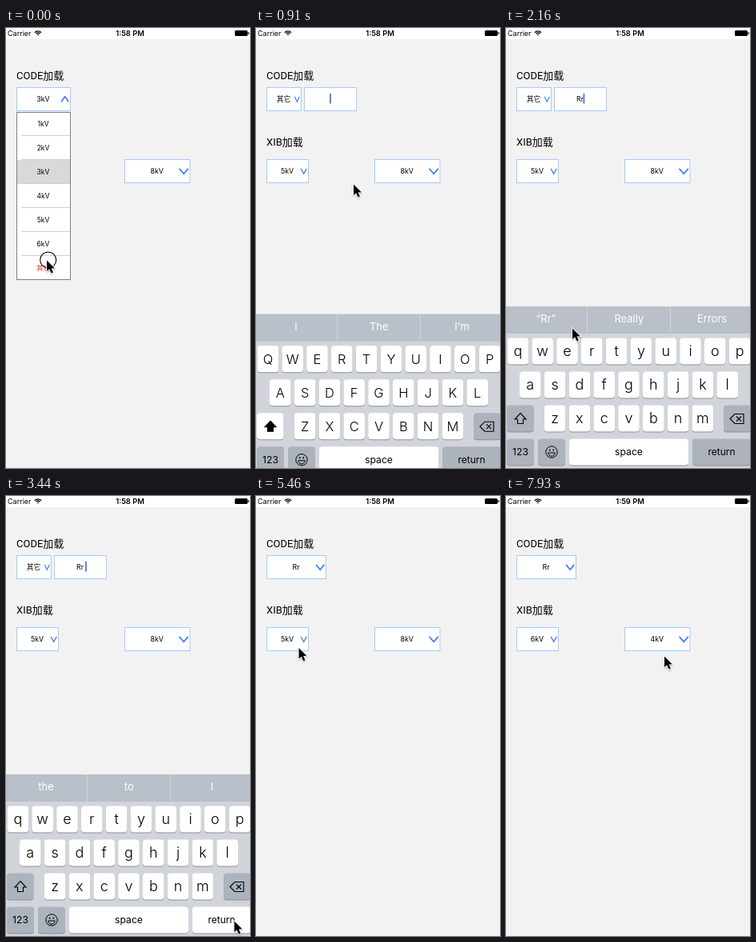
Recreate the animation shown at these times as an HTML page with a canvas. Size 305 by 550 pixels, loop 7990 ms.

```html
<!DOCTYPE html>
<html lang="zh">
<head>
<meta charset="utf-8">
<style>
html, body { margin: 0; width: 100%; height: 100%; overflow: hidden; background: #f2f2f2; }
canvas { display: block; width: 305px; height: 550px; }
</style>
</head>
<body>
<canvas id="stage"></canvas>
<script>
const LOOP = 7990, W = 305, H = 550, BLUE = '#3478f6', DARK_KEY = '#acb3bd';
const CJK = '"Noto Sans CJK SC", "Noto Sans CJK", sans-serif';
const canvas = document.getElementById('stage');
const c = canvas.getContext('2d');
const scale = window.devicePixelRatio || 1;
canvas.width = W * scale;
canvas.height = H * scale;

const OTHER = '其它';
const LEVELS = [1, 2, 3, 4, 5, 6].map(n => n + 'kV');
const WITH_OTHER = [...LEVELS, OTHER];

const rowY = (top, row) => top + 30 * (row + 0.5);
const KEYBOARD_H = 202, KEY_PITCH = 30.8, ROW_PITCH = 42;
const FIRST_ROW = H - KEYBOARD_H + 56;

// What the user does, in order; a tap takes effect shortly after it lands.
const TAP = {
  pickOther: 0, typeUpper: 1480, typeLower: 1860, suggest: 2480, enter: 3320,
  openLeft: 4140, pickFive: 4830, reopenLeft: 5590, pickSix: 6270, openRight: 6880, pickFour: 7460
};
const REACTION = 60;
const tapTimes = Object.values(TAP);

// The pointer eases from stop to stop and rests at each one.
const REST = 100;
const stop = (time, x, y) => ({ time, x, y });
const STOPS = [
  stop(TAP.pickOther, 51, 290),
  stop(860, 122, 195),
  stop(TAP.typeUpper, 106, FIRST_ROW),
  stop(TAP.typeLower, 106, FIRST_ROW),
  stop(2110, 83, 375),
  stop(TAP.suggest, 50, 365),
  stop(TAP.enter, 286, 532),
  stop(TAP.openLeft, 55, 179),
  stop(4340, 60, 267),
  stop(TAP.pickFive, 50, rowY(195, 4)),
  stop(TAP.reopenLeft, 54, 174),
  stop(TAP.pickSix, 42, rowY(195, 5)),
  stop(6380, 42, rowY(195, 5)),
  stop(TAP.openRight, 189, 179),
  stop(TAP.pickFour, 190, rowY(195, 3)),
  stop(7850, 198, 200)
];

const clamp = v => Math.max(0, Math.min(1, v));
const smooth = v => v * v * (3 - 2 * v);
const easeOut = v => 1 - (1 - v) ** 3;
const ramp = (t, start, length) => clamp((t - start) / length);
const within = (t, from, to) => t >= from && t < to;
const isTapped = (t, tap) => within(t, tap, tap + 90);
const happened = (t, tap) => t >= tap + REACTION;
const openness = (t, openTap, pickTap) =>
  easeOut(ramp(t, openTap + REACTION, 160)) - easeOut(ramp(t, pickTap + REACTION, 160));

function text(s, x, cy, size, { color = '#000', align = 'center', weight = 400, face = 'Inter' } = {}) {
  c.font = `${weight} ${size}px ${face}, ${CJK}`;
  c.fillStyle = color;
  c.textAlign = align;
  c.fillText(s, x, cy + size * 0.36);
}

function rect(x, y, w, h, color) {
  c.fillStyle = color;
  c.fillRect(x, y, w, h);
}

function roundRect(x, y, w, h, r, color) {
  c.beginPath();
  c.roundRect(x, y, w, h, r);
  c.fillStyle = color;
  c.fill();
}

function frame(x, y, w, h, color) {
  c.strokeStyle = color;
  c.lineWidth = 1;
  c.strokeRect(x + 0.5, y + 0.5, w - 1, h - 1);
}

function line(points, color, width, { closed = false, fill } = {}) {
  c.beginPath();
  points.forEach(([x, y]) => c.lineTo(x, y));
  if (closed) c.closePath();
  c.strokeStyle = color;
  c.lineWidth = width;
  c.stroke();
  if (fill) { c.fillStyle = fill; c.fill(); }
}

function arc(x, y, r, from, to, width, closed = false) {
  c.beginPath();
  c.arc(x, y, r, from * Math.PI, to * Math.PI);
  if (closed) c.closePath();
  c.strokeStyle = '#000';
  c.lineWidth = width;
  c.stroke();
}

function box(x, y, w) {
  rect(x, y, w, 30, '#fff');
  frame(x, y, w, 30, '#a6caf8');
}

function dropdown({ x, y, w, label, open = 0, items, selected }) {
  const centerX = x + w / 2 - 0.5, cy = y + 15;
  box(x, y, w);
  text(label, centerX, cy, 8.8);
  const half = w * 0.068, tipX = x + w - 2.7 - half, rise = open > 0 ? -3.2 : 3.2;
  line([[tipX - half, cy - rise], [tipX, cy + rise], [tipX + half, cy - rise]], BLUE, 0.5 + w * 0.015);
  if (open <= 0) return;

  const top = y + 31, height = items.length * 30 * open;
  c.save();
  c.beginPath();
  c.rect(x, top, w, height);
  c.clip();
  rect(x, top, w, height, '#fff');
  items.forEach((item, i) => {
    if (item === selected) rect(x, top + i * 30, w, 30, '#d9d9d9');
    if (i) rect(x + 6, top + i * 30 - 1, w - 6, 1, '#cfcfcf');
    text(item, centerX, rowY(top, i) - 0.5, 8.5, { color: item === OTHER ? '#f33' : '#000' });
  });
  c.restore();
  frame(x, top, w, height, '#808080');
}

function statusBar(t) {
  rect(0, 0, W, 14, '#fff');
  text('Carrier', 2, 7, 9, { align: 'left' });
  text(t < 7000 ? '1:58 PM' : '1:59 PM', 155, 7, 9.3, { weight: 600 });
  for (let r = 1; r < 7; r += 2.3) arc(40, 9.5, r, -0.76, -0.24, 1.4);
  roundRect(286, 3, 16, 7, 1.5, '#000');
  roundRect(302.5, 5, 1.2, 3, 0.5, '#000');
}

function key(x, y, w, label = '', size = 12.2, color = '#fff', weight = 400) {
  roundRect(x, y + 1, w, 33, 4, '#8b8f95');
  roundRect(x, y, w, 33, 4, color);
  text(label, x + w / 2, y + 16.5, size, { weight });
}

function predictions(t) {
  if (happened(t, TAP.suggest)) return ['the', 'to', 'I'];
  if (happened(t, TAP.typeLower)) return ['“Rr”', 'Really', 'Errors'];
  if (happened(t, TAP.typeUpper)) return ['“R”', 'Really', 'Right'];
  return ['I', 'The', "I'm"];
}

function shiftIcon(x, y, filled) {
  const right = [[0, -7], [7, 0.5], [3.5, 0.5], [3.5, 6]];
  const left = right.map(([dx, dy]) => [-dx, dy]).reverse();
  line([...right, ...left].map(([dx, dy]) => [x + dx, y + dy]), '#000', 1.1,
    { closed: true, fill: filled && '#000' });
}

function deleteIcon(x, y) {
  line([[x - 9, y], [x - 3, y - 6], [x + 8, y - 6], [x + 8, y + 6], [x - 3, y + 6]], '#000', 1.1, { closed: true });
  [-3, 3].forEach(d => line([[x - 1, y - d], [x + 5, y + d]], '#000', 1.1));
}

function smiley(x, y) {
  arc(x, y, 7.2, 0, 2, 1);
  arc(x, y + 1, 4.2, 0, 1, 1, true);
  [-2.3, 2.3].forEach(dx => roundRect(x + dx - 0.8, y - 3.6, 1.6, 2.4, 0.8, '#000'));
}

function keyboard(t) {
  const shown = easeOut(ramp(t, 580, 520)) - smooth(ramp(t, 3510, 330));
  if (shown <= 0) return;
  const top = H - KEYBOARD_H * shown, caps = !happened(t, TAP.typeUpper);
  const rowTop = row => top + 39.5 + row * ROW_PITCH;

  rect(0, top, W, KEYBOARD_H, '#d1d5db');
  rect(0, top, W, 34, '#b9c0c9');
  if (isTapped(t, TAP.suggest)) rect(0, top, 101, 34, '#d1d5db');
  predictions(t).forEach((word, i) => {
    if (i) rect(104 * i - 3, top, 1, 33, '#d0d5db');
    text(word, 50 + i * 103.8, top + 15.5, 13, { color: '#fff' });
  });

  ['qwertyuiop', 'asdfghjkl', 'zxcvbnm'].forEach((letters, row) => {
    const start = 153.5 - (letters.length - 1) / 2 * KEY_PITCH;
    [...letters].forEach((letter, i) =>
      key(start + i * KEY_PITCH - 13.3, rowTop(row), 26.6,
        caps ? letter.toUpperCase() : letter, caps ? 16.5 : 18, '#fff', 300));
  });

  key(1, rowTop(2), 33.5, '', 0, caps ? '#fff' : DARK_KEY);
  shiftIcon(18, rowTop(2) + 17, caps);
  key(272, rowTop(2), 34, '', 0, DARK_KEY);
  deleteIcon(289, rowTop(2) + 17);
  key(1, rowTop(3), 34, '123', 12.2, DARK_KEY);
  key(40, rowTop(3), 34, '', 0, DARK_KEY);
  smiley(57, rowTop(3) + 16.5);
  key(79, rowTop(3), 149, 'space');
  key(233, rowTop(3), 73, 'return', 12, t > TAP.enter ? '#fff' : DARK_KEY);
}

function inputField(t) {
  box(60, 74, 66);
  const value = 'Rr'.slice(0, happened(t, TAP.typeUpper) + happened(t, TAP.typeLower));
  text(value, 92.5, 88.5, 8.8);
  const space = happened(t, TAP.suggest) ? 2.5 : 0;
  const caretX = 92.5 + c.measureText(value).width / 2 + space;
  if (t % 1000 < 500 || t % 1000 > 850) rect(caretX - 0.4, 82, 1.7, 12.5, '#4672e6');
}

function pointer(t) {
  const to = STOPS.find(s => s.time > t) || STOPS.at(-1);
  const from = STOPS[STOPS.indexOf(to) - 1];
  const k = smooth(ramp(t, from.time + REST, Math.max(1, to.time - from.time - REST)));
  const x = from.x + (to.x - from.x) * k, y = from.y + (to.y - from.y) * k;
  if (tapTimes.some(tap => isTapped(t, tap))) arc(x + 1.7, y, 10, 0, 2, 1.1);

  const shape = [[0, 0.5], [0, 14], [3.1, 11.3], [5.6, 16.6], [7.9, 15.6], [5.6, 10.4], [9.8, 10.2]]
    .map(([dx, dy]) => [x + dx, y + dy]);
  c.save();
  c.shadowColor = '#0005';
  c.shadowBlur = 2 * scale;
  c.shadowOffsetY = scale;
  line(shape, '#fff', 1.4, { closed: true });
  c.restore();
  line(shape, '#fff', 1.4, { closed: true, fill: '#000' });
}

function draw(t) {
  c.setTransform(scale, 0, 0, scale, 0, 0);
  rect(0, 0, W, H, '#f2f2f2');
  statusBar(t);
  text('CODE加载', 13, 59.5, 13, { align: 'left', face: 'Roboto' });
  text('XIB加载', 13, 142, 13, { align: 'left', face: 'Roboto' });

  dropdown({
    x: 148, y: 164, w: 82.5, items: WITH_OTHER,
    label: happened(t, TAP.pickFour) ? '4kV' : '8kV',
    open: openness(t, TAP.openRight, TAP.pickFour),
    selected: t > TAP.pickFour && '4kV'
  });
  dropdown({
    x: 13, y: 164, w: 53, items: LEVELS,
    label: happened(t, TAP.pickSix) ? '6kV' : '5kV',
    open: openness(t, TAP.openLeft, TAP.pickFive) + openness(t, TAP.reopenLeft, TAP.pickSix),
    selected: t > TAP.pickSix ? '6kV' : t > TAP.pickFive && '5kV'
  });

  const choosing = t < 150, editing = within(t, 150, 3520);
  if (editing) inputField(t);
  dropdown({
    x: 13, y: 74, items: WITH_OTHER,
    w: choosing ? 68 : editing ? 44 : 75,
    label: choosing ? '3kV' : editing ? OTHER : 'Rr',
    open: 1 - easeOut(ramp(t, 120, 160)),
    selected: happened(t, TAP.pickOther) ? OTHER : '3kV'
  });

  keyboard(t);
  pointer(t);
}

const begin = performance.now();
function tick() {
  draw((performance.now() - begin) % LOOP);
  requestAnimationFrame(tick);
}
tick();
</script>
</body>
</html>
```
